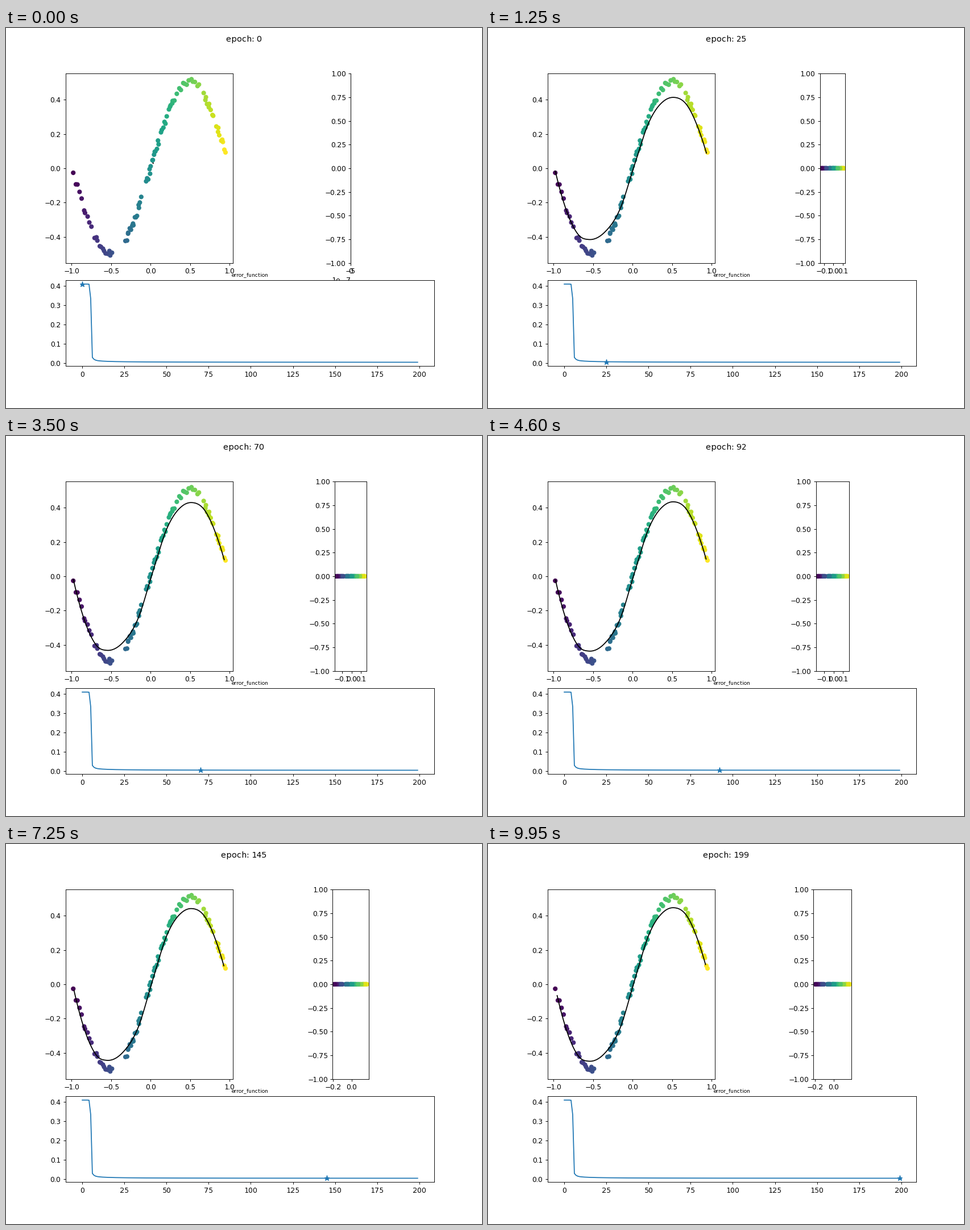
A matplotlib script for the animation above (10000 ms loop, 837 by 669 pixels).

```python
import numpy as np
import matplotlib.pyplot as plt
from matplotlib.animation import FuncAnimation

W, H, DPI = 837, 669, 83.6
EPOCHS = 200
START_ERROR = 0.4082
CENTRE = 0.03

# Stretches of x covered by samples: start, end, count.
RUNS = [(-0.98, -0.90, 4), (-0.874, -0.75, 6), (-0.71, -0.49, 12),
        (-0.32, -0.12, 16), (-0.058, 0.10, 14), (0.13, 0.30, 12),
        (0.33, 0.61, 12), (0.67, 0.79, 9), (0.83, 0.946, 9)]

# Key points of the fitted curve at epoch 25.
KEY_X = np.array([-0.979, -0.795, -0.68, -0.558, -0.356, -0.162, 0.025,
                  0.205, 0.399, 0.518, 0.687, 0.845, 0.934])
KEY_Y = np.array([-0.017, -0.298, -0.391, -0.415, -0.373, -0.239, 0.023,
                  0.268, 0.394, 0.413, 0.367, 0.212, 0.086])
SLOPE = np.gradient(KEY_Y, KEY_X, edge_order=2)


def make_samples(rng):
    """Noisy sine samples in random drawing order."""
    x = []
    for start, end, count in RUNS:
        inner = np.linspace(start, end, count)
        inner[1:-1] += rng.uniform(-0.008, 0.008, count - 2)
        x.extend(inner)
    x = rng.permutation(x)
    return x, 0.5 * np.sin(np.pi * x) + rng.uniform(-0.02, 0.02, len(x))


def error_at(epoch):
    """Flat start, sudden drop, then a slow decay."""
    epoch = np.asarray(epoch, float)
    plateau = START_ERROR - 0.075 * 100.0 ** np.minimum(epoch - 5, 0)
    late = np.maximum(epoch, 6)
    decay = 0.0028 + 0.075 / late + 0.0127 * np.exp(6 - late)
    return np.where(epoch < 6, plateau, decay)


def hermite(x):
    """Smooth curve through the key points."""
    i = np.clip(np.searchsorted(KEY_X, x) - 1, 0, len(KEY_X) - 2)
    h = KEY_X[i + 1] - KEY_X[i]
    s = (x - KEY_X[i]) / h
    return ((1 + 2 * s) * (1 - s) ** 2 * KEY_Y[i]
            + s * (1 - s) ** 2 * h * SLOPE[i]
            + s * s * (3 - 2 * s) * KEY_Y[i + 1]
            + s * s * (s - 1) * h * SLOPE[i + 1])


def log_age(epoch):
    return np.log(max(epoch, 1) / 25)


def fitted_curve(epoch):
    done = epoch / (EPOCHS - 1)
    x = np.linspace(KEY_X[0] + 0.023 * done ** 3, KEY_X[-1] - 0.013 * done, 300)
    y = (1 + 0.0385 * log_age(epoch)) * hermite(x)
    # The curve unfolds from one point as the error falls.
    unfold = 1.136 * (1 - np.sqrt(error_at(epoch) / START_ERROR))
    unfold = np.clip(unfold, 0.002, 1)
    return CENTRE + unfold * (x - CENTRE), CENTRE + unfold * (y - CENTRE)


def latent_limits(epoch):
    """Exponential growth that turns into a logarithmic one."""
    reach = 0.1413 + 0.0348 * log_age(epoch)
    if epoch < 6:
        reach = 5.5e-7 * np.exp(2.1 * epoch)
    return -reach, 0.88 * reach


xs, ys = make_samples(np.random.default_rng(4))
share = (xs - xs.min()) / np.ptp(xs)
epochs = np.arange(EPOCHS)
errors = error_at(epochs)

plt.rcParams["text.hinting_factor"] = 1  # whole-pixel letter spacing
fig = plt.figure(figsize=(W / DPI, H / DPI), dpi=DPI)
title = fig.suptitle("epoch: 0")

ax_fit = plt.subplot2grid((3, 2), (0, 0), rowspan=2)
ax_latent = plt.subplot2grid((3, 2), (0, 1), rowspan=2)
ax_error = plt.subplot2grid((3, 2), (2, 0), colspan=2)

ax_fit.scatter(xs, ys, c=xs)
curve, = ax_fit.plot([], [], color="black")
ax_fit.set_xlim(-1.078, 1.043)
ax_fit.set_ylim(-0.5515, 0.5515)

latent = ax_latent.scatter(xs, 0 * xs, c=xs)
ax_latent.set_ylim(-1, 1)
ax_latent.set_aspect("equal", adjustable="box")

ax_error.plot(epochs, errors, color="C0")
star, = ax_error.plot([0], [errors[0]], "*", color="C0", markersize=8)
ax_error.set_xlim(-9.95, 208.95)
ax_error.set_ylim(-0.0173, 0.4285)
ax_error.set_title("error_function", fontsize=8)


def update(epoch):
    title.set_text(f"epoch: {epoch}")
    curve.set_data(*fitted_curve(epoch))
    left, right = latent_limits(epoch)
    z = left + (right - left) * (1 + 20 * share) / 22
    latent.set_offsets(np.column_stack([z, 0 * z]))
    ax_latent.set_xlim(left, right)
    star.set_data([epoch], [errors[epoch]])
    return title, curve, latent, star


anim = FuncAnimation(fig, update, frames=EPOCHS, interval=50,
                     init_func=lambda: update(0), repeat=True, repeat_delay=0)
plt.show()
```
